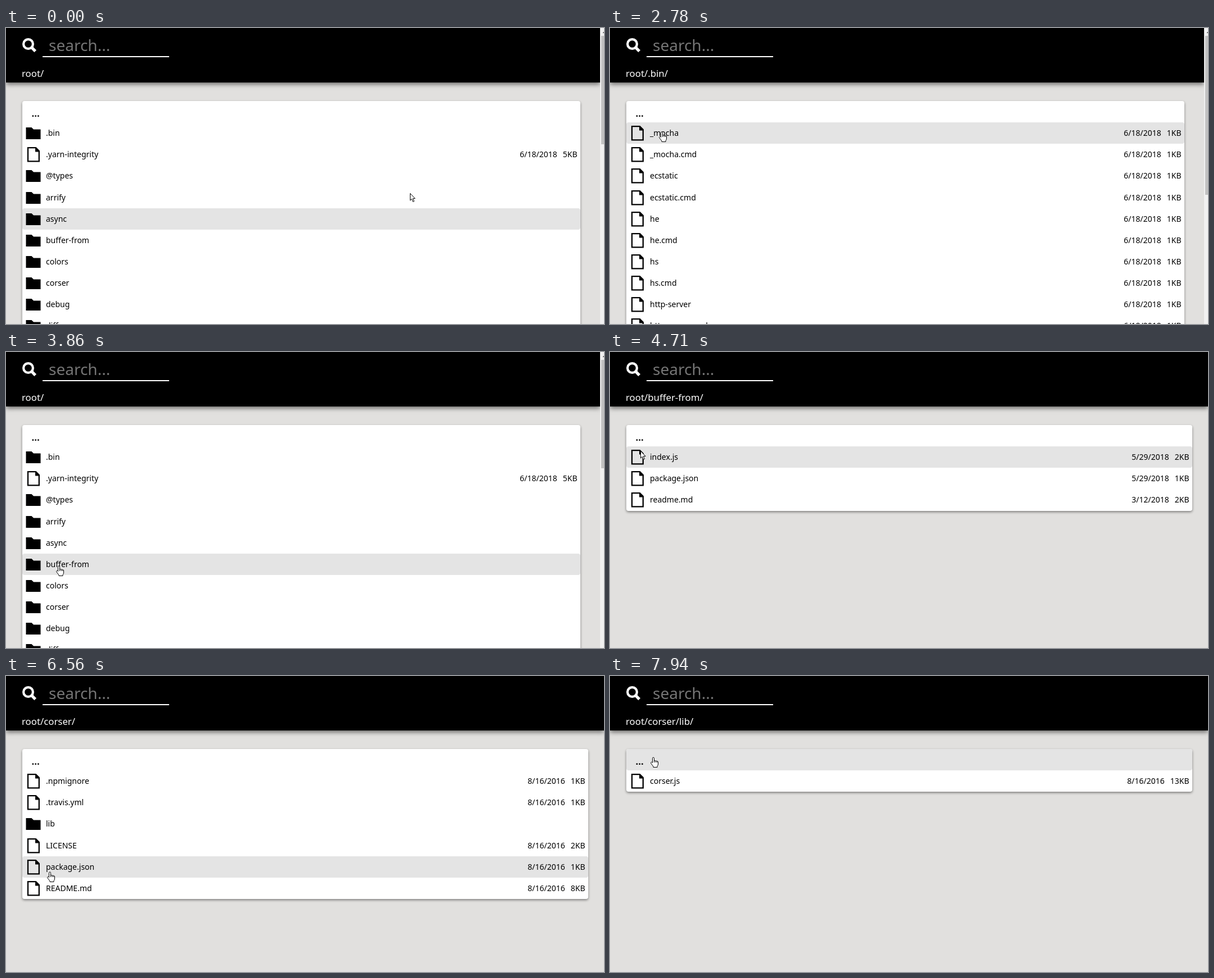
An HTML page for the animation above (8000 ms loop, 1063 by 527 pixels).

```html
<!DOCTYPE html>
<html lang="en">
<head>
<meta charset="utf-8">
<title>File browser</title>
<style>
  html, body { margin: 0; width: 100%; height: 100%; overflow: hidden; }
  body { position: relative; background: #e1e0de; color: #000; font: 14px "Noto Sans", sans-serif; }
  body * { position: absolute; box-sizing: border-box; white-space: pre; }
  header { left: 0; top: 0; height: 97px; background: #000; color: #fff; box-shadow: 0 3px 8px rgba(0, 0, 0, .55); }
  header svg { left: 0; top: 0; }
  #hint { left: 76px; top: 11px; font-size: 28px; line-height: 38px; color: #757575; }
  #rule { left: 65px; top: 50px; width: 225px; height: 2px; background: #fff; }
  #path { left: 28px; top: 69px; font-size: 16.8px; line-height: 23px; }
  #card { left: 29px; top: 130px; background: #fff; border-radius: 4px; box-shadow: 0 2px 4px rgba(0, 0, 0, .45); }
  .row { left: 0; width: 100%; height: 38.125px; line-height: 38px; border-radius: 4px; }
  .row.on { background: #e4e4e4; }
  .row svg { left: 6px; top: 6px; }
  .name { left: 42px; top: 0; }
  .up .name { left: 16.5px; top: 3px; font-size: 16.8px; font-weight: bold; }
  .meta { right: 5.5px; top: 0; }
  .meta span { position: static; margin-left: 10px; }
  #bar { left: 1056px; top: 0; width: 17px; height: 100%; background: #f1f1f1; }
  #thumb { left: 2px; top: 14px; width: 13px; background: #c1c1c1; }
  #bar svg { left: 0; top: 0; }
  #cursor { left: 0; top: 0; overflow: visible; }
</style>
</head>
<body>
<div id="card"></div>
<header>
  <svg width="64" height="60" fill="none" stroke="#fff">
    <circle cx="39.5" cy="28.5" r="8.4" stroke-width="4.2"/>
    <path d="M45.5 34.5L52.2 41.4" stroke-width="5.2"/>
  </svg>
  <div id="hint">search...</div>
  <div id="rule"></div>
  <div id="path"></div>
</header>
<div id="bar">
  <div id="thumb"></div>
  <svg width="17" height="14"><path d="M4.5 9L8.5 5L12.5 9Z" fill="#505050"/></svg>
</div>
<svg id="cursor" width="1" height="1" fill="#fff" stroke="#000" stroke-linejoin="round">
  <path id="arrow" d="M.5 .5V13L3.3 10.3L5.4 15.4L7.5 14.5L5.4 9.6H9.2Z"/>
  <g id="hand">
    <path d="M-1.5 9V1.5a1.5 1.5 0 0 1 3 0V6q1.4-1 2.7 .4q1.4-.8 2.5 .4q1.3-.4 1.8 1V12q0 2-1.5 3.5V17.5H0V16L-4 10.8Q-5.2 8.8-3.5 8.2Q-2.5 8-1.5 9.5Z"/>
    <path d="M1.5 6V9M4.2 6.4V9M6.7 6.8V9" fill="none"/>
  </g>
</svg>
<script>
const LOOP = 8000, TICK = 77, ROW = 38.125, TOP = 130;
const $ = id => document.getElementById(id);

const FOLDER = '<path d="M.5 3H10.5L14 6.5H26.5V24H.5Z"/>';
const FILE = '<path d="M4 1.2H18L23.8 7V25.3H4Z" fill="none" stroke="#000" stroke-width="2.3"/><path d="M17 1H18.5L24.5 7V8.5H17Z"/>';

// Entries: a bare name is a folder, "name|date|size" is a file.
const dated = (date, names) => names.map(n => n.includes('|') ? n.replace('|', `|${date}|`) : n);

const folders = {
  root: { path: 'root/', thumb: 193, items: dated('6/18/2018', ['.bin', '.yarn-integrity|5KB', '@types', 'arrify',
    'async', 'buffer-from', 'colors', 'corser', 'debug', 'diff']) },
  bin: { path: 'root/.bin/', thumb: 283, items: dated('6/18/2018',
    ['_mocha', 'ecstatic', 'he', 'hs', 'http-server'].flatMap(n => [n + '|1KB', n + '.cmd|1KB'])) },
  buffer: { path: 'root/buffer-from/', items: [...dated('5/29/2018', ['index.js|2KB', 'package.json|1KB']),
    'readme.md|3/12/2018|2KB'] },
  corser: { path: 'root/corser/', items: dated('8/16/2016', ['.npmignore|1KB', '.travis.yml|1KB', 'lib',
    'LICENSE|2KB', 'package.json|1KB', 'README.md|8KB']) },
  lib: { path: 'root/corser/lib/', items: dated('8/16/2016', ['corser.js|13KB']) }
};

// Times in the script are counted in ticks.
const start = { x: 718, y: 294, open: 'root' };
const script = [
  { from: 0, to: 6, x: 330, y: 27 },
  { from: 6, to: 18, x: 116, y: 187 },
  { from: 25, to: 28, x: 95, y: 188, click: 32, open: 'bin' },
  { from: 35, to: 40, x: 62, y: 158, click: 43, open: 'root' },
  { from: 44, to: 50, x: 94, y: 381, click: 55, open: 'buffer' },
  { from: 55, to: 63, x: 47, y: 138, click: 67, open: 'root' },
  { from: 68, to: 74, x: 82, y: 457, click: 80, open: 'corser' },
  { from: 80, to: 89.5, x: 74, y: 257, click: 94, open: 'lib' },
  { from: 98, to: 103, x: 77, y: 145 }
];

const ease = p => p * p * (3 - 2 * p);

function stateAt(tick) {
  let { x, y, open } = start;
  for (const move of script) {
    const p = ease(Math.min(1, Math.max(0, (tick - move.from) / (move.to - move.from))));
    x += (move.x - x) * p;
    y += (move.y - y) * p;
    if (tick >= move.click) open = move.open;
  }
  return { x: Math.round(x), y: Math.round(y), open };
}

function rowHtml(item, i) {
  const [name, date, size] = item.split('|');
  const meta = date ? `<div class="meta"><span>${date}</span><span>${size}</span></div>` : '';
  return `<div class="row" style="top:${(i + 1) * ROW}px"><svg width="28" height="28">${date ? FILE : FOLDER}</svg>` +
    `<div class="name">${name}</div>${meta}</div>`;
}

let shown;
function openFolder(key) {
  if (key === shown) return;
  shown = key;
  const { path, thumb, items } = folders[key];
  $('path').textContent = path;
  $('card').innerHTML = '<div class="row up" style="top:0"><div class="name">...</div></div>' + items.map(rowHtml).join('');
  $('card').style.height = (items.length + 1) * ROW + 'px';
  $('card').style.width = (thumb ? 992 : 1006) + 'px';
  document.querySelector('header').style.width = (thumb ? 1056 : 1063) + 'px';
  $('bar').style.display = thumb ? '' : 'none';
  $('thumb').style.height = thumb + 'px';
}

function draw(t) {
  // The small offset absorbs rounding in the tick length.
  const tick = Math.floor(t / TICK + .1);
  const { x, y, open } = stateAt(tick);
  openFolder(open);
  const rows = [...$('card').children];
  // The highlight trails the pointer until its first step.
  const over = tick ? Math.floor((y - TOP) / ROW) : 5;
  rows.forEach((row, i) => row.classList.toggle('on', i === over));
  const label = rows[over]?.querySelector('.name');
  const link = label && (over === 0 || (x >= 71 && x <= 71 + label.offsetWidth));
  $('hand').style.display = link ? '' : 'none';
  $('arrow').style.display = link ? 'none' : '';
  $('cursor').style.transform = `translate(${x}px, ${y}px)`;
}

const begin = performance.now();
function frame() {
  draw((performance.now() - begin) % LOOP);
  requestAnimationFrame(frame);
}
frame();
</script>
</body>
</html>
```
